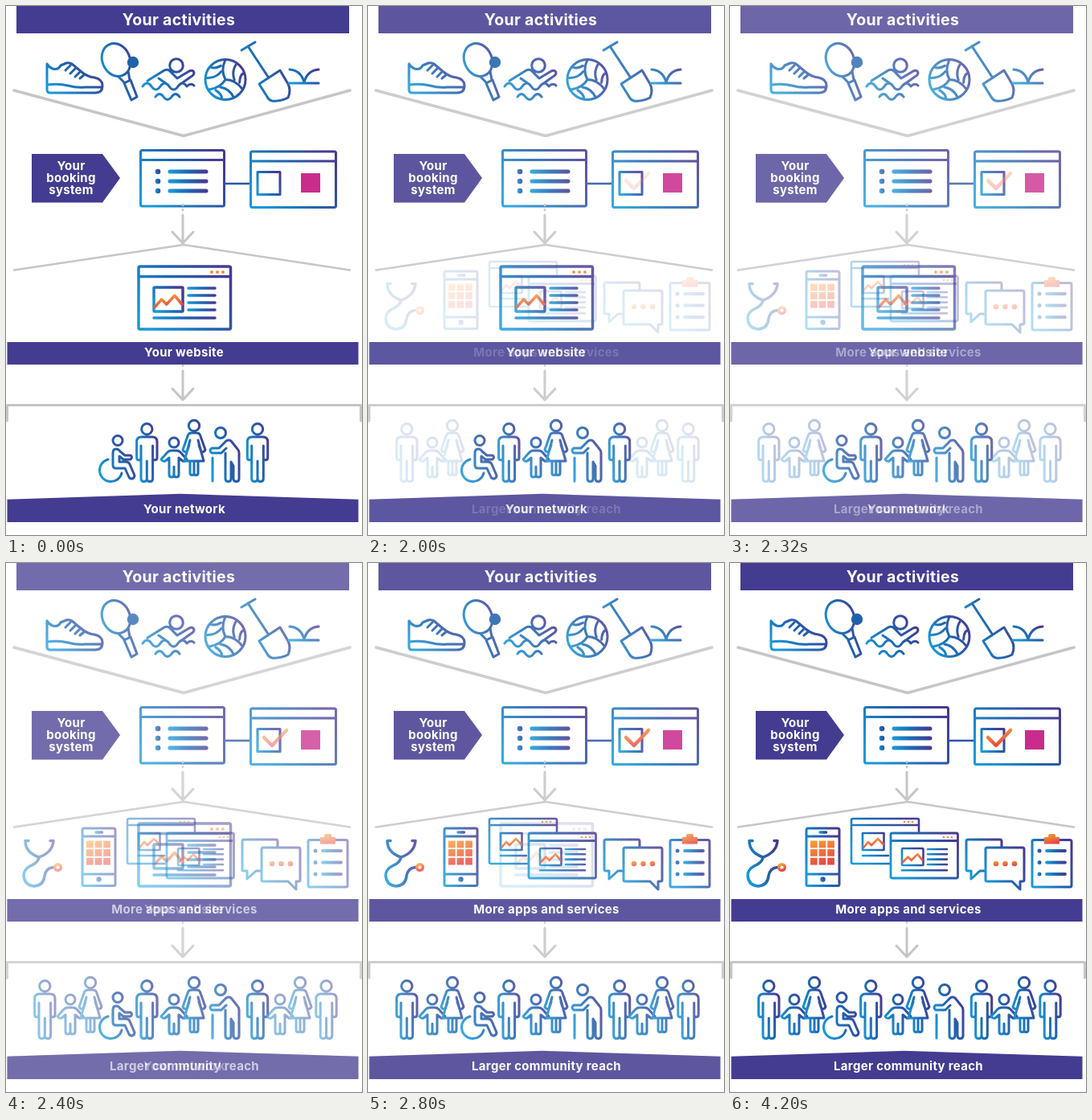
An HTML page that plays this animation: 443x658 px, repeating every 5 s.

```html
<!DOCTYPE html>
<html lang="en">
<head>
<meta charset="utf-8">
<title>Your activities</title>
<style>
  html, body { margin: 0; width: 100%; height: 100%; overflow: hidden; background: #fff; }
  svg { display: block; width: 443px; height: 658px; }
  text { font: 700 15px Inter, Roboto, sans-serif; letter-spacing: .3px; fill: #fff; text-anchor: middle; }
  .title { font-size: 19.5px; }
  .stroke { fill: none; stroke-linecap: round; stroke-linejoin: round; }
  .bar { fill: #443c91; }
  /* Cross-fade in sixths, held for 200 ms each */
  #before { animation: leave 5s step-end infinite; }
  #after { animation: arrive 5s step-end infinite; }
  @keyframes leave {
    0% { opacity: 1; } 40% { opacity: .8333; } 44% { opacity: .6667; } 48% { opacity: .5; }
    52% { opacity: .3333; } 56% { opacity: .1667; } 60%, 100% { opacity: 0; }
  }
  @keyframes arrive {
    0% { opacity: 0; } 40% { opacity: .1667; } 44% { opacity: .3333; } 48% { opacity: .5; }
    52% { opacity: .6667; } 56% { opacity: .8333; } 60%, 100% { opacity: 1; }
  }
</style>
</head>
<body>
<svg viewBox="0 0 443 658">
  <defs>
    <linearGradient id="blue" x1="0" y1=".75" x2="1" y2=".25">
      <stop offset="0" stop-color="#1799d8"/><stop offset=".5" stop-color="#1f66b0"/><stop offset="1" stop-color="#463a92"/>
    </linearGradient>
    <linearGradient id="level" href="#blue" y1="0" y2="0"/>
    <linearGradient id="orange" x1="0" y1="0" x2=".4" y2="1">
      <stop offset="0" stop-color="#f8a332"/><stop offset="1" stop-color="#e84a45"/>
    </linearGradient>
  </defs>
  <g id="before"></g>
  <g id="after"></g>
</svg>
<script>
const circle = (x, y, r) => `M${x - r},${y}a${r},${r} 0 1 0 ${2 * r},0a${r},${r} 0 1 0 ${-2 * r},0z`;
const box = (x, y, w, h, r = 2) =>
  `M${x + r},${y}h${w - 2 * r}q${r},0 ${r},${r}v${h - 2 * r}q0,${r} ${-r},${r}h${2 * r - w}q${-r},0 ${-r},${-r}v${2 * r - h}q0,${-r} ${r},${-r}z`;
const dots = (xs, ys, r) => xs.flatMap(x => ys.map(y => circle(x, y, r))).join('');

const stroke = (d, width, paint) => `<path class="stroke" stroke="${paint}" stroke-width="${width}" d="${d}"/>`;
const line = (d, width = 3) => stroke(d, width, 'url(#blue)');
const warm = (d, width = 3) => stroke(d, width, 'url(#orange)');
const grey = (d, width = 3) => stroke(d, width, '#c6c6c6');
// The tiny step keeps a single row's bounding box from being flat, so its gradient paints
const rows = (x1, x2, ys, width) => stroke(ys.map(y => `M${x1},${y}H${x2}v.01`).join(''), width, 'url(#level)');
const fill = (d, paint = 'url(#blue)') => `<path fill="${paint}" d="${d}"/>`;
const bar = points => `<polygon class="bar" points="${points}"/>`;
const label = (x, y, words, cls = '') => `<text class="${cls}" x="${x}" y="${y}">${words}</text>`;
const at = (x, art) => `<g transform="translate(${x})">${art}</g>`;

const man = x => at(x, line(circle(0, 526.3, 6.7) +
  'M-7.3,547V562q0,2.7-2.7,2.7t-2.7-2.7V542q0-6 6-6H6.7q6,0 6,6V562q0,2.7-2.7,2.7t-2.7-2.7V547' +
  'M-7.3,562V588q0,3.5 3.65,3.5t3.65-3.5V566M7.3,562V588q0,3.5-3.65,3.5t-3.65-3.5'));
const child = x => at(x, line(circle(0, 543, 6) +
  'M-6,562L-11,566q-3,1-5-2L-8,555q2-2 5-2H3q3,0 5,2L16,564q-2,3-5,2L6,562' +
  'M-6,562V583q0,3 3,3t3-3V573M6,562V583q0,3-3,3t-3-3'));
const woman = x => at(x, line(circle(0, 522, 6.7) +
  'M-5,540L-12,566H12L5,540M-6,546L-9,555q-4,0-5-3L-8,535q1-4 5-4H3q4,0 5,4L14,552q-1,3-5,3L6,546' +
  'M-5,566V581q0,2.5 2.5,2.5t2.5-2.5V566M5,566V581q0,2.5-2.5,2.5t-2.5-2.5'));
const wheelchair = line(circle(139, 540.5, 6) +
  'M127,564A14,14 0 1 0 144,581M133,571V556q0-5 4-5q3,0 5,3L148,559H155q3,2 0,5H146L141,560V567H149' +
  'q4,0 5,3L160,584q0,3-3,4q-3,0-4-2L148,575H137q-4,0-4-4');
const elder = line(circle(267, 531, 6.5) +
  'M257,562V591M273,556V588q0,3.5 3.5,3.5t3.5-3.5V567L283,572V588q0,3.5 3.5,3.5t3.5-3.5V556' +
  'q0-3-2-5L280,541q-3-2-6,0L265,550H256q-4,3 0,6H268L274,550');

// Volleyball seams: one third of the ball, turned three times
const seams = (x, y, r) => [-90, 30, 150].map(turn => {
  const p = (angle, part) => {
    const a = (turn + angle) * Math.PI / 180;
    return `${(x + r * part * Math.cos(a)).toFixed(1)},${(y + r * part * Math.sin(a)).toFixed(1)}`;
  };
  return `M${x},${y}Q${p(-30, .5)} ${p(0, 1)}M${p(35, 1)}Q${p(35, .5)} ${p(92, .45)}M${p(70, 1)}Q${p(72, .75)} ${p(102, .72)}`;
}).join('');

// Picture, text rows and hill line inside a browser window
const article = (x, y, w, h, x1, x2, ys, bottom, width) =>
  line(box(x, y, w, h, 1), width) + rows(x1, x2, ys, width) + rows(x, x2, [bottom], width) +
  warm(`M${x + 1},${y + h * .82}l${w * .24},${-h * .32}l${w * .17},${h * .2}l${w * .28},${-h * .36}L${x + w - 1},${y + h * .7}`, width);

const activities =
  bar('13,0 427,0 427,34 13,34') + label(215, 24, 'Your activities', 'title') +
  grey('M10,105L221,161.5L428,105', 3.5) +
  line('M51,72V104q0,4 4,4H111q9,0 9-9q0-8-10-10Q101,88 94,82L82,72q-3-2-7-1L68,74Q65,80 58,78Q53,76 51,72' +
    'M51,98Q66,96 77,99T98,101H119M74,80L80,74M80,84L87,77M86,88L93,81M92,90L98,85') +
  line('M128.5,47.8A16.8 21 -24 1 1 145.5,86.2A16.8 21 -24 1 1 128.5,47.8M140,88L148,96M152,81L154,92M147,96L155,92L163,113L156,117Z') +
  fill(circle(158, 70, 7.2), '#1f62ac') +
  line(circle(212, 74, 8.3) +
    'M176,93L197,80q4-2 7,1L213,90L228,81q5-2 6,2q0,3-4,5L216,98M190,90L200,97' +
    'M170,100q5.5-8 11,0t11,0t11,0t11,0t11,0q5,-5 9,-1M186,113q5-7 10,0t10,0t10,0') +
  line(circle(273, 91.5, 25) + seams(273, 91.5, 25)) +
  line('M293,55L310,45M301,50L326,88M315,97L341,80L351,97q4,8 0,17q-10,5-20,4q-4-1-6-5Z') +
  line('M352,96H389M353,79Q367,80 371,95Q375,80 389,79');

const booking =
  bar('32,184 120,184 142,214 120,244.5 32,244.5') +
  ['Your', 'booking', 'system'].map((word, i) => label(81, 203.5 + 15 * i, word)).join('') +
  line(box(167.5, 179.5, 104, 69.5) + 'M168,191.5H271') +
  fill(dots([189], [206, 218, 230], 3.3)) + rows(204, 249, [206, 218, 230], 5) +
  fill('M272,219.7h32v2.5h-32z', '#2d55a2') +
  line(box(304.5, 181, 106, 69.5) + 'M305,193H410') + line(box(313, 206.5, 28, 28, 0)) +
  fill('M367,208h24v24h-24z', '#c92c8d');

const arrow = (top, tip) => grey(`M220,${top}V${tip - 1}M207,${tip - 14}L220,${tip}L233,${tip - 14}`);
const shared = activities + booking +
  grey('M220,247v1M220,253v1M220,447v.5', 2.5) + arrow(260, 295) + arrow(454, 490) +
  grey('M10,328.5L221,297L428,328.5', 2.5) + bar('1.5,418 438.5,418 438.5,446 1.5,446') +
  grey('M1.5,516V496.5H441.5V516') + bar('1.5,613.8 217,606.7 438.5,613.8 438.5,642 1.5,642') +
  wheelchair + elder + [175.3, 313].map(man).join('') + child(209) + woman(234);

const website =
  line(box(165, 324, 114.5, 78) + 'M165,336.5H279', 3.5) +
  fill(dots([256, 263, 270], [331], 2), '#f08a3c') +
  article(184, 350, 36, 30, 227, 260, [351, 360, 369, 378], 388, 3.5);

const stethoscope =
  line('M28,345.5H24Q24,360 41,366Q58,360 59,345.5H55M41,366Q40,373 30,377Q22,381 22,389Q23,401 35,402' +
    'Q47,401 48,389Q50,379 59,378.5', 3.5) + warm(circle(64.5, 378.5, 3.8), 3.5);
const cells = [0, 1, 2].flatMap(i => [0, 1, 2].map(j => box(100 + 10.6 * i, 345.5 + 10.6 * j, 8.7, 8.7, 0))).join('');
const phone = line(box(95, 330, 41, 71.5) + 'M95,340H136M95,387H136') +
  rows(112, 119.5, [335], 3.5) + fill(circle(115.5, 393.5, 3.2)) + fill(cells, 'url(#orange)');
const pages =
  line('M199,374H153q-2,0-2-2V320q0-2 2-2H233q2,0 2,2V334M151,326H235', 2.6) +
  fill(dots([217, 222, 227], [322], 1.3), '#f08a3c') +
  line(box(165, 336, 26.5, 21, 0) + 'M165,364H197', 2.6) +
  warm('M166,354L172,347L176,351L184,343L191,350', 2.6) +
  line(box(200, 336, 83.5, 56) + 'M200,345.5H283', 2.8) +
  fill(dots([266, 271, 276], [341], 1.3), '#f08a3c') +
  article(214, 355, 26.5, 21, 246, 270, [356, 362.3, 368.6, 375], 382.3, 2.6);
const chat =
  line('M316,383H311L300,393V383H296q-2,0-2-2V346q0-2 2-2H336q2,0 2,2V353') +
  line('M320,354H364q2,0 2,2V394q0,2-2,2H361V406L351,396H320q-2,0-2-2V356q0-2 2-2z') +
  fill(dots([331, 342.5, 354], [374], 3.3), 'url(#orange)');
const clipboard =
  line(box(376, 344.5, 49, 58.5)) + fill(dots([385], [358, 372.5, 387], 2.5)) +
  rows(394, 417, [358, 372.5, 387], 3.8) +
  fill('M391,341H396V339q0-2 2-2H403q2,0 2,2V341H410V349.5H391z', 'url(#orange)');

document.getElementById('before').innerHTML = shared + website +
  label(221.5, 436, 'Your website') + label(222, 631, 'Your network');

document.getElementById('after').innerHTML = shared +
  warm('M321,217L331,227L349,208', 4.5) + stethoscope + phone + pages + chat + clipboard +
  [48.3, 398.5].map(man).join('') + [80, 341].map(child).join('') + [105, 366].map(woman).join('') +
  label(222, 436, 'More apps and services') + label(222, 631, 'Larger community reach');
</script>
</body>
</html>
```
